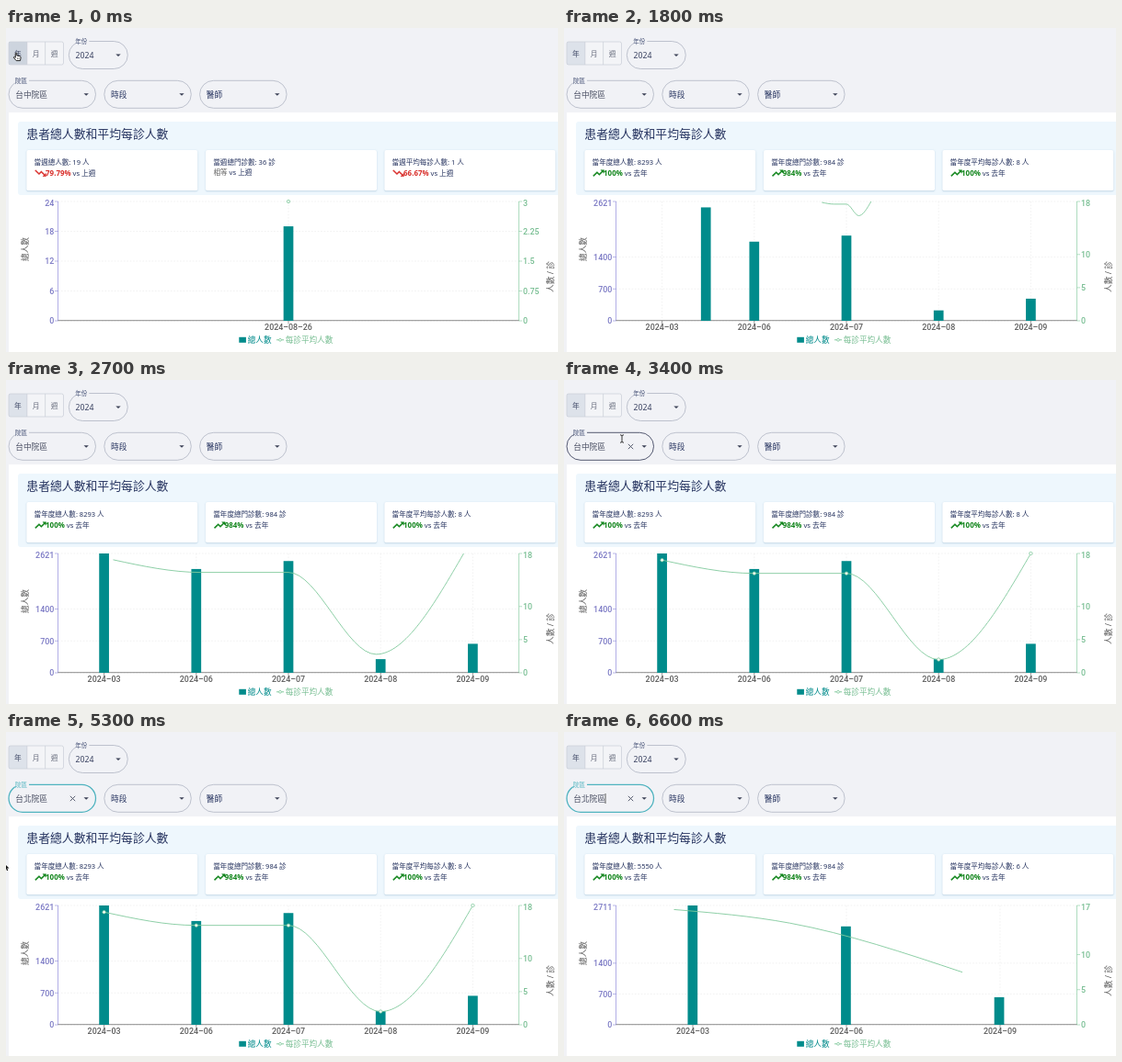
An HTML page with a canvas that plays this animation: 600 by 353 pixels, repeating every 6700 ms.

```html
<!DOCTYPE html>
<html lang="zh-Hant">
<head>
<meta charset="utf-8">
<title>患者總人數和平均每診人數</title>
<style>
html, body { margin: 0; width: 100%; height: 100%; overflow: hidden; background: #f1f2f6; }
canvas { display: block; width: 600px; height: 353px; }
</style>
</head>
<body>
<canvas id="stage"></canvas>
<script>
const LOOP = 6700, STEP = 100;
const W = 600, H = 353;
const canvas = document.getElementById('stage');
const dpr = window.devicePixelRatio || 1;
canvas.width = W * dpr;
canvas.height = H * dpr;
const ctx = canvas.getContext('2d');

const UI = '"Noto Sans", "Noto Sans CJK TC", "Noto Sans CJK", sans-serif';
const TICK = 'Roboto, "Noto Sans CJK TC", "Noto Sans CJK", sans-serif';
const NAVY = '#26335f', GREY = '#5c5c5c', TEAL = '#008b8b', GREEN = '#82ca9d', PURPLE = '#8884d8';
const CYAN = '#4fb3bf', RED = '#d9302c', UP = '#11851b';
const TICK_L = '#7a78c4', TICK_R = '#76bd91';

const PLOT = { x: 56.5, y: 189, w: 501, h: 130 };
const BASE = PLOT.y + PLOT.h;
const BAR_W = 10.7;

// Moments of the story, in ms
const T = {
  year: 400, leave: 700, load: 1550, grow: 1615, enter: 2850,
  open: 3700, toMenu: 3800, pick: 4800, exit: 5000, swap: 6150, morph: 6240
};

const sets = {
  day: { bars: [19], line: [3], maxL: 24, maxR: 3, left: [0, 6, 12, 18, 24], right: [0, 0.75, 1.5, 2.25, 3],
         names: ['2024–08–26'] },
  months: { bars: [2621, 2280, 2455, 300, 637], line: [17, 15, 15, 2, 18], maxL: 2621, maxR: 18,
            left: [0, 700, 1400, 2621], right: [0, 5, 10, 18],
            names: ['03', '06', '07', '08', '09'].map(m => '2024–' + m) },
  quarters: { bars: [2711, 2235, 615], line: [17, 15, 16.4], maxL: 2711, maxR: 17,
              left: [0, 700, 1400, 2711], right: [0, 5, 10, 17],
              names: ['03', '06', '09'].map(m => '2024–' + m) }
};
for (const s of Object.values(sets)) {
  s.xs = s.bars.map((_, i) => PLOT.x + PLOT.w * (i + 0.5) / s.bars.length);
  s.barPts = s.bars.map((v, i) => ({ x: s.xs[i], y: BASE - PLOT.h * v / s.maxL }));
  s.linePts = s.line.map((v, i) => ({ x: s.xs[i], y: BASE - PLOT.h * v / s.maxR }));
}

const clamp = v => Math.max(0, Math.min(1, v));
const mix = (a, b, k) => a + (b - a) * k;
const mixPt = (a, b, k) => ({ x: mix(a.x, b.x, k), y: mix(a.y, b.y, k) });
const smooth = k => k * k * (3 - 2 * k);

// cubic-bezier(.25, .1, .25, 1)
function ease(p) {
  if (p <= 0) return 0;
  if (p >= 1) return 1;
  const at = (a, b, u) => 3 * a * u * (1 - u) ** 2 + 3 * b * u * u * (1 - u) + u ** 3;
  let lo = 0, hi = 1;
  for (let i = 0; i < 24; i++) {
    const u = (lo + hi) / 2;
    if (at(0.25, 0.25, u) < p) lo = u; else hi = u;
  }
  return at(0.1, 1, lo);
}

function text(str, x, cy, size, color = NAVY, opt = {}) {
  ctx.font = `${opt.weight || 400} ${size}px ${opt.font || UI}`;
  ctx.fillStyle = color;
  ctx.textAlign = opt.align || 'left';
  ctx.fillText(str, x, cy + size * 0.37);
  return ctx.measureText(str).width;
}

function upright(str, x, y, size) {
  ctx.save();
  ctx.translate(x, y);
  ctx.rotate(-Math.PI / 2);
  text(str, 0, 0, size, GREY, { align: 'center', weight: 500 });
  ctx.restore();
}

function rect(x, y, w, h, color) {
  ctx.fillStyle = color;
  ctx.fillRect(x, y, w, h);
}

function round(x, y, w, h, r) {
  ctx.beginPath();
  ctx.roundRect(x, y, w, h, r);
}

function seg(x1, y1, x2, y2, color, width = 1, dash = []) {
  ctx.strokeStyle = color;
  ctx.lineWidth = width;
  ctx.setLineDash(dash);
  ctx.beginPath();
  ctx.moveTo(x1, y1);
  ctx.lineTo(x2, y2);
  ctx.stroke();
  ctx.setLineDash([]);
}

function shadow(color, blur, dy) {
  ctx.shadowColor = color;
  ctx.shadowBlur = blur * dpr;
  ctx.shadowOffsetY = dy * dpr;
}

function caret(x, y, up) {
  const d = up ? -1.3 : 1.3;
  ctx.fillStyle = '#3c4257';
  ctx.beginPath();
  ctx.moveTo(x - 2.7, y - d);
  ctx.lineTo(x + 2.7, y - d);
  ctx.lineTo(x, y + d);
  ctx.fill();
}

function pill(x, y, w, label, value, o = {}) {
  round(x, y, w, 30, 15);
  ctx.strokeStyle = o.border || '#b0b5c3';
  ctx.lineWidth = o.width || 0.8;
  ctx.stroke();
  if (label) {
    rect(x + 6, y - 2, 16, 4, '#f1f2f6');
    text(label, x + 7, y, 6.5, o.labelColor || '#3d4a70', { weight: 500 });
  }
  if (o.marked) rect(x + 6.5, y + 8.5, 36, 13.5, '#a9cde0');
  text(value, x + 7.2, y + 15.2, 8.7, o.color || '#3a4261');
  if (o.clear) {
    const cx = x + 69.5, cy = y + 15.2;
    seg(cx - 2.7, cy - 2.7, cx + 2.7, cy + 2.7, '#454b60', 0.9);
    seg(cx - 2.7, cy + 2.7, cx + 2.7, cy - 2.7, '#454b60', 0.9);
  }
  caret(x + w - 10.3, y + 15.2, o.open);
}

const trendDown = new Path2D('M16 18l2.29-2.29-4.88-4.88-4 4L2 7.41 3.41 6l6 6 4-4 6.3 6.29L22 12v6z');
const trendUp = new Path2D('M16 6l2.29 2.29-4.88 4.88-4-4L2 16.59 3.41 18l6-6 4 4 6.3-6.29L22 12V6z');

function card(x, title, change, dir, versus) {
  ctx.save();
  shadow('rgba(90,140,175,.38)', 1.6, 0.6);
  round(x, 133, 186, 44.3, 2);
  ctx.fillStyle = '#fff';
  ctx.fill();
  ctx.restore();
  text(title, x + 8.3, 146.4, 7.55, NAVY, { weight: 500 });
  let tx = x + 8.5;
  const color = dir > 0 ? UP : dir < 0 ? RED : GREY;
  if (dir) {
    const icon = dir > 0 ? trendUp : trendDown;
    ctx.save();
    ctx.translate(x + 8, 151.2);
    ctx.scale(0.6, 0.58);
    ctx.fillStyle = ctx.strokeStyle = color;
    ctx.lineWidth = 0.7;
    ctx.fill(icon);
    ctx.stroke(icon);
    ctx.restore();
    tx = x + 20.8;
  }
  tx += text(change, tx, dir ? 158.2 : 157.6, dir ? 7.9 : 7.55, color, { weight: dir ? 600 : 400 });
  text('vs ' + versus, tx + 2, dir ? 158.2 : 157.6, 7.7, NAVY, { weight: 500 });
}

function cards(t) {
  const late = t >= T.load;
  const span = t < T.year ? '當週' : '當年度';
  const versus = t < T.year ? '上週' : '去年';
  const [total, visits, mean] = t >= T.swap ? [5550, 984, 6] : late ? [8293, 984, 8] : [19, 36, 1];
  card(22.3, `${span}總人數: ${total} 人`, late ? '100%' : '79.79%', late ? 1 : -1, versus);
  card(217, `${span}總門診數: ${visits} 診`, late ? '984%' : '相等', late ? 1 : 0, versus);
  card(411.3, `${span}平均每診人數: ${mean} 人`, late ? '100%' : '66.67%', late ? 1 : -1, versus);
}

function dot(x, y, r) {
  ctx.beginPath();
  ctx.arc(x, y, r, 0, Math.PI * 2);
  ctx.fillStyle = '#fff';
  ctx.fill();
  ctx.strokeStyle = GREEN;
  ctx.lineWidth = 0.8;
  ctx.stroke();
}

// Monotone cubic through the points
function curve(p) {
  const n = p.length;
  if (n < 2 || p[n - 1].x - p[0].x < 0.5) return;
  const h = [], s = [], m = [];
  for (let i = 0; i < n - 1; i++) {
    h[i] = p[i + 1].x - p[i].x;
    s[i] = (p[i + 1].y - p[i].y) / h[i];
  }
  for (let i = 1; i < n - 1; i++) {
    const q = (s[i - 1] * h[i] + s[i] * h[i - 1]) / (h[i - 1] + h[i]);
    m[i] = (Math.sign(s[i - 1]) + Math.sign(s[i])) *
      Math.min(Math.abs(s[i - 1]), Math.abs(s[i]), 0.5 * Math.abs(q));
  }
  m[0] = (3 * s[0] - m[1]) / 2;
  m[n - 1] = (3 * s[n - 2] - m[n - 2]) / 2;
  ctx.beginPath();
  ctx.moveTo(p[0].x, p[0].y);
  for (let i = 0; i < n - 1; i++) {
    const d = h[i] / 3, a = p[i], b = p[i + 1];
    ctx.bezierCurveTo(a.x + d, a.y + m[i] * d, b.x - d, b.y - m[i + 1] * d, b.x, b.y);
  }
  ctx.strokeStyle = GREEN;
  ctx.lineWidth = 0.9;
  ctx.stroke();
}

function axes(s) {
  const right = PLOT.x + PLOT.w;
  const faint = '#ececec';
  const tick = (str, x, y, color, align) =>
    text(str, x, y, 8.9, color, { font: TICK, align, weight: 500 });
  for (const v of s.left) {
    const y = BASE - PLOT.h * v / s.maxL;
    seg(PLOT.x, y, right, y, faint, 0.7, [1.7, 1.7]);
    seg(PLOT.x - 3.5, y, PLOT.x, y, PURPLE, 0.6);
    tick(v, 52.3, Math.max(191, y), TICK_L, 'right');
  }
  for (const v of s.right) {
    const y = BASE - PLOT.h * v / s.maxR;
    seg(right, y, right + 3.5, y, GREEN, 0.6);
    tick(v, 562, Math.max(191, y), TICK_R, 'left');
  }
  s.xs.forEach((x, i) => {
    seg(x, PLOT.y, x, BASE, faint, 0.7, [1.7, 1.7]);
    seg(x, BASE, x, BASE + 3.5, GREY, 0.6);
    tick(s.names[i], x, 326, GREY, 'center');
  });
  seg(PLOT.x, PLOT.y, PLOT.x, BASE, PURPLE, 0.65);
  seg(right, PLOT.y, right, BASE, GREEN, 0.65);
  seg(PLOT.x, BASE - 0.3, right, BASE - 0.3, GREY, 0.7);
}

function chart(t) {
  let now = sets.day, prev = null, start = 0;
  if (t >= T.swap) [now, prev, start] = [sets.quarters, sets.months, T.morph];
  else if (t >= T.load) [now, prev, start] = [sets.months, sets.day, T.grow];
  axes(now);

  const kBar = prev ? ease((t - start) / 400) : 1;
  const kLine = prev ? ease((t - start) / 1500) : 1;
  now.barPts.forEach((p, i) => {
    const from = prev && prev.barPts[i] || { x: p.x, y: BASE };
    const q = mixPt(from, p, kBar);
    rect(q.x - BAR_W / 2, q.y, BAR_W, BASE - q.y, TEAL);
  });
  const pts = now.linePts.map((p, i) => {
    if (!prev) return p;
    const from = prev.linePts[Math.floor(i * prev.linePts.length / now.linePts.length)];
    return mixPt(from, p, kLine);
  });
  curve(pts);
  if (kLine === 1) pts.forEach(p => dot(p.x, p.y, 1.7));

  upright('總人數', 21, 241, 8.7);
  upright('人數 / 診', 592, 271, 8.7);
  rect(253.3, 336.8, 7.6, 6, TEAL);
  text('總人數', 262.7, 339.6, 8.6, TEAL, { weight: 500 });
  seg(294, 339.8, 302, 339.8, GREEN, 1);
  dot(298, 339.8, 1.4);
  text('每診平均人數', 303.7, 339.6, 8.6, TICK_R, { weight: 500 });
}

function toggles(hover) {
  round(3, 15, 60, 25, 2);
  ctx.fillStyle = '#f3f4f7';
  ctx.fill();
  rect(3, 15, 20, 25, hover ? '#cdd4de' : '#dde2ea');
  round(3, 15, 59.5, 25, 2);
  ctx.strokeStyle = '#cdd1da';
  ctx.lineWidth = 0.8;
  ctx.stroke();
  seg(22.8, 15, 22.8, 40, '#cdd1da', 0.8);
  seg(42.6, 15, 42.6, 40, '#cdd1da', 0.8);
  ['年', '月', '週'].forEach((s, i) =>
    text(s, 12.8 + i * 19.9, 27.7, 7.8, i ? '#6b7080' : '#3f4866', { align: 'center' }));
}

function menu(hover) {
  ctx.save();
  shadow('rgba(0,0,0,.3)', 5, 2);
  round(3, 91.5, 95, 62.5, 2);
  ctx.fillStyle = '#fff';
  ctx.fill();
  ctx.restore();
  rect(3, 92, 95, 19.3, '#ebf6f8');
  if (hover) rect(3, 111.3, 95, 19.3, '#f4f6f7');
  ['台中院區', '台北院區', '高雄院區'].forEach((s, i) => text(s, 11, 101.6 + i * 19.3, 8.6));
}

// Pointer position and shape, or null while hidden
function pointer(t) {
  const go = (a, b, from, dur) => mixPt(a, b, smooth(clamp((t - from) / dur)));
  const tab = { x: 11, y: 27 }, rest = { x: 315, y: 20 };
  const field = { x: 63, y: 64 }, item = { x: 28, y: 124 };
  if (t < T.load) {
    const p = go(tab, rest, T.leave, 600);
    return { ...p, kind: p.x < 60 ? 'hand' : 'arrow' };
  }
  if (t < T.enter) return null;
  if (t < T.toMenu) {
    const p = go({ x: 84, y: -12 }, field, T.enter, 480);
    return { ...p, kind: p.y > 57 ? 'beam' : 'arrow' };
  }
  if (t < T.exit) {
    const p = go(field, item, T.toMenu, 480);
    return { ...p, kind: p.y > 92 ? (t < T.pick ? 'hand' : 'arrow') : p.y < 87 ? 'beam' : 'arrow' };
  }
  const p = go(item, { x: -12, y: 150 }, T.exit, 450);
  return p.x < -10 ? null : { ...p, kind: 'arrow' };
}

const arrow = new Path2D('M0 0V7.2L1.7 5.7 2.7 8.1 3.9 7.6 2.8 5.2H5.1Z');
const hand = new Path2D('M-.7 .4Q0-.5 .8 .4V3L3.9 3.7Q5.2 4 5.1 5.2L4.5 8.6H.2L-2.7 5.2Q-2.6 4.2-1.6 4.6L-.7 5.3Z');

function drawPointer(p) {
  if (!p) return;
  if (p.kind === 'beam') {
    seg(p.x, p.y - 3.5, p.x, p.y + 3.5, '#222', 0.9);
    for (const d of [-1, 1]) {
      seg(p.x - 2, p.y + d * 4.3, p.x, p.y + d * 3.5, '#222', 0.9);
      seg(p.x + 2, p.y + d * 4.3, p.x, p.y + d * 3.5, '#222', 0.9);
    }
    return;
  }
  const isHand = p.kind === 'hand';
  const shape = isHand ? hand : arrow;
  ctx.save();
  ctx.translate(p.x, p.y);
  ctx.lineJoin = 'round';
  ctx.strokeStyle = isHand ? '#111' : '#fff';
  ctx.fillStyle = isHand ? '#fff' : '#111';
  ctx.lineWidth = isHand ? 0.9 : 1.2;
  if (!isHand) ctx.stroke(shape);
  ctx.fill(shape);
  if (isHand) {
    ctx.stroke(shape);
    seg(1.5, 5.4, 1.5, 7.2, '#111', 0.5);
    seg(3, 5.4, 3, 7.2, '#111', 0.5);
  }
  ctx.restore();
}

function filters(t, p) {
  const focus = t >= T.open, open = focus && t < T.pick;
  const hover = !!p && p.kind === 'beam';
  toggles(!!p && p.x < 23 && p.y < 40 && p.kind === 'hand');
  pill(68.3, 14.5, 64, '年份', '2024');
  pill(3, 57.3, 94.5, '院區', t < T.pick ? '台中院區' : '台北院區', {
    border: focus ? CYAN : hover ? '#2c3350' : undefined,
    width: focus ? 1.3 : 0.8,
    labelColor: focus ? CYAN : undefined,
    color: '#4b5064',
    marked: open, clear: focus || hover, open
  });
  const blink = (t - 6400 + LOOP * 10) % 1000 < 500;
  if (t >= T.pick && blink) seg(45, 67, 45, 78, '#333', 0.8);
  pill(106.8, 57.3, 94.5, '', '時段', { color: NAVY });
  pill(210.6, 57.3, 94.5, '', '醫師', { color: NAVY });
  if (open) menu(!!p && p.y > 111 && p.y < 131);
}

function draw(t) {
  ctx.setTransform(dpr, 0, 0, dpr, 0, 0);
  rect(0, 0, W, H, '#f1f2f6');
  rect(3, 92, W - 3, H - 92, '#fff');
  round(13, 102, W, 80, 3);
  ctx.fillStyle = '#eef7fd';
  ctx.fill();
  text('患者總人數和平均每診人數', 22.3, 115.5, 12.85, NAVY, { weight: 500 });
  cards(t);
  chart(t);
  const p = pointer(t);
  filters(t, p);
  drawPointer(p);
}

function tick() {
  const t = performance.now() % LOOP;
  draw(Math.floor(t / STEP) * STEP);
  requestAnimationFrame(tick);
}
tick();
</script>
</body>
</html>
```
